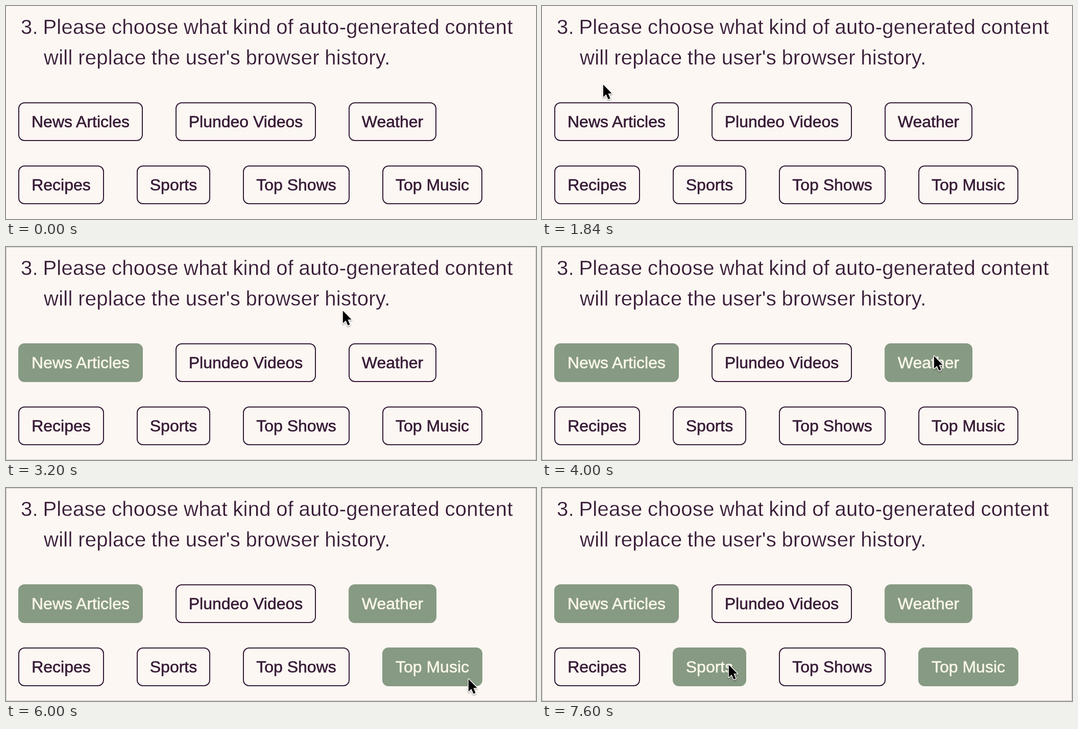
Write an HTML page that moves like this. It is 1038 by 418 pixels and loops after 8 s.

```html
<!DOCTYPE html>
<html lang="en">
<head>
<meta charset="utf-8">
<title>Content choice</title>
<style>
html, body { margin: 0; width: 100%; height: 100%; overflow: hidden; background: #fcf7f3; }
svg { display: block; width: 100%; height: 100%; font-family: "Liberation Sans", Arial, sans-serif; }
.title { font-size: 40px; letter-spacing: .3px; word-spacing: -1px; fill: #371b36; stroke: #fcf7f3; stroke-width: .3px; }
.label { font-size: 32px; text-anchor: middle; stroke-width: .6px; }
</style>
</head>
<body>
<svg viewBox="0 0 1038 418">
  <defs>
    <filter id="shadow" x="-50%" y="-50%" width="200%" height="200%">
      <feDropShadow dx="0" dy="2" stdDeviation="1.6" flood-opacity=".35"/>
    </filter>
  </defs>
  <rect width="1038" height="418" fill="#fcf7f3"/>
  <g class="title">
    <text x="29" y="55">3.</text>
    <text x="72.4" y="55">Please choose what kind of auto-generated content</text>
    <text x="74" y="115">will replace the user's browser history.</text>
  </g>
  <g id="buttons"></g>
  <rect id="frame" x=".5" y=".5" width="1037" height="417" fill="none" stroke="#c8c4c2"/>
  <g id="cursor" filter="url(#shadow)">
    <path d="M.8 1V25.5L6.4 20.2L10.6 29.8L14.6 28L10.4 18.6L17.6 18.2Z"
      fill="#000" stroke="#fff" stroke-width="2.6" stroke-linejoin="round" paint-order="stroke"/>
  </g>
</svg>
<script>
const LOOP = 8000, STEP = 80, FADE = 200, FRAME_ON = 2240;
const LEFT = 24, TOP = 189, GAP = 64, ROW = 124, HEIGHT = 76;
const PAPER = [252, 247, 243], INK = [55, 27, 54], SAGE = [135, 154, 131], CREAM = [250, 247, 234];

const rows = [
  [
    { label: 'News Articles', width: 244, on: 1980 },
    { label: 'Plundeo Videos', width: 275 },
    { label: 'Weather', width: 172, on: 3500 }
  ],
  [
    { label: 'Recipes', width: 168 },
    { label: 'Sports', width: 144, on: 7380 },
    { label: 'Top Shows', width: 209, on: 6914, off: 7000 },
    { label: 'Top Music', width: 196, on: 5480 }
  ]
];

// Eased pointer moves, each along a cubic curve
const moves = [
  { from: 1520, to: 2240, curve: [[70, -40], [120, 162], [144, 250], [144, 224]] },
  { from: 2640, to: 3720, curve: [[144, 224], [601, 94], [808, 91], [767, 213]] },
  { from: 4320, to: 5680, curve: [[767, 213], [930, 150], [1080, 470], [905, 374]] },
  { from: 6080, to: 7600, curve: [[905, 374], [830, 460], [597, 194], [365, 346]] }
];

const get = id => document.getElementById(id);
const clamp = v => Math.max(0, Math.min(1, v));
const ease = u => u * u * (3 - 2 * u);
const mix = (a, b, k) => `rgb(${a.map((v, i) => Math.round(v + (b[i] - v) * k))})`;

function add(parent, tag, attrs) {
  const el = document.createElementNS('http://www.w3.org/2000/svg', tag);
  set(el, attrs);
  return parent.appendChild(el);
}

function set(el, attrs) {
  for (const k in attrs) el.setAttribute(k, attrs[k]);
}

rows.forEach((row, r) => {
  let x = LEFT;
  const y = TOP + r * ROW;
  for (const b of row) {
    b.box = add(get('buttons'), 'rect',
      { x: x + 1, y: y + 1, width: b.width - 2, height: HEIGHT - 2, rx: 11, 'stroke-width': 2 });
    b.text = add(get('buttons'), 'text', { x: x + b.width / 2, y: y + 49.3, class: 'label' });
    b.text.textContent = b.label;
    x += b.width + GAP;
  }
});

function pointer(t) {
  const { from, to, curve: [a, b, c, d] } = moves.findLast(m => t >= m.from) ?? moves[0];
  const s = ease(clamp((t - from) / (to - from))), q = 1 - s;
  return a.map((v, i) =>
    q * q * q * v + 3 * q * q * s * b[i] + 3 * q * s * s * c[i] + s * s * s * d[i]);
}

function drawButton({ box, text, on = Infinity, off = Infinity }, t) {
  const rise = clamp((Math.min(t, off) - on) / FADE);
  const k = clamp(rise - Math.max(0, t - off) / FADE);
  const ink = mix(INK, CREAM, k);
  set(box, { fill: mix(PAPER, SAGE, k), stroke: mix(INK, SAGE, k) });
  set(text, { fill: ink, stroke: ink });
}

function draw(t) {
  for (const b of rows.flat()) drawButton(b, t);
  get('frame').style.display = t >= FRAME_ON ? '' : 'none';
  get('cursor').style.display = t >= moves[0].from ? '' : 'none';
  set(get('cursor'), { transform: `translate(${pointer(t).map(v => v.toFixed(1))})` });
}

let start;
function tick(now) {
  start ??= now;
  draw(Math.floor((now - start) % LOOP / STEP) * STEP);
  requestAnimationFrame(tick);
}
draw(0);
requestAnimationFrame(tick);
</script>
</body>
</html>
```
